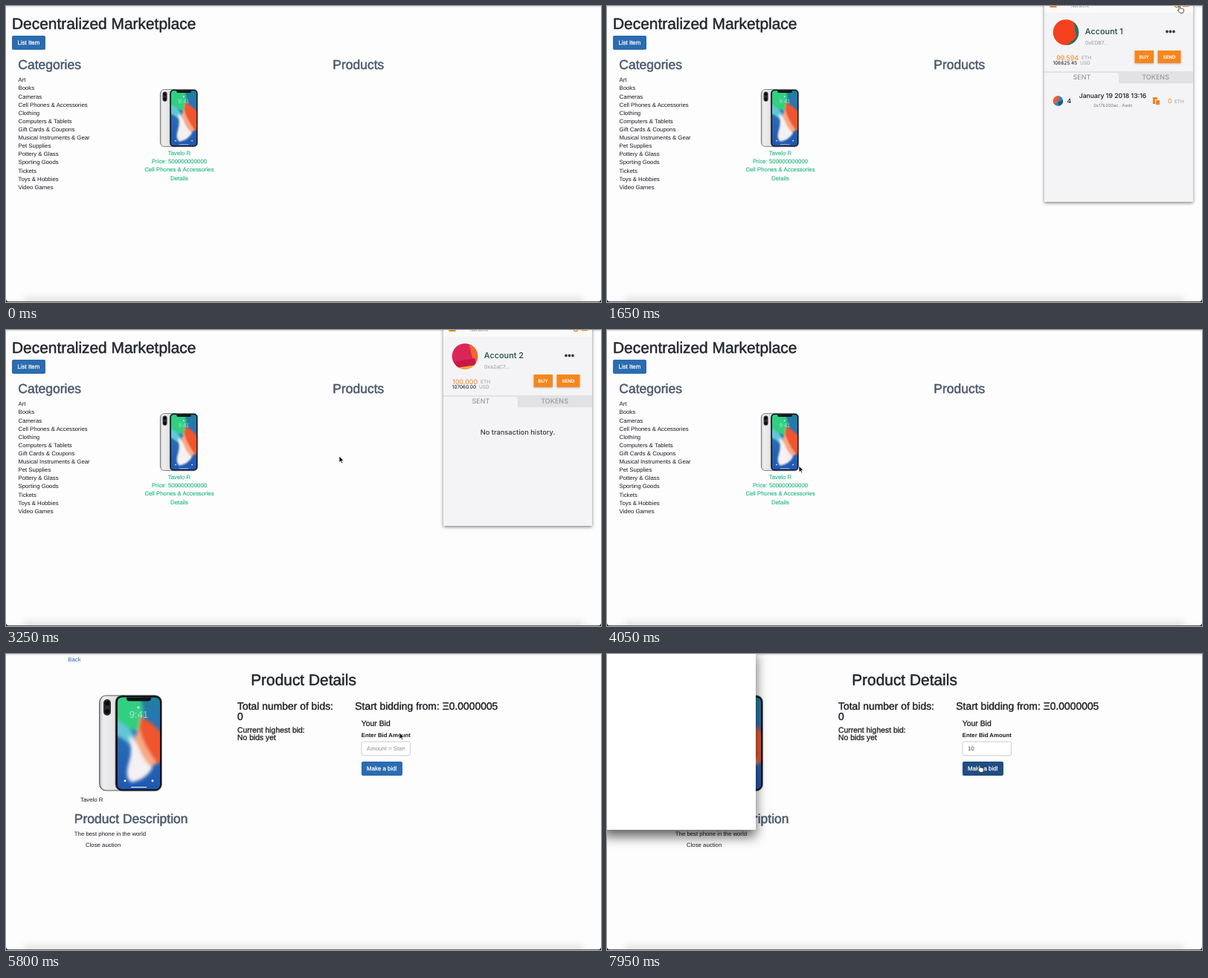
An HTML page that plays this animation: 800x399 px, repeating every 8000 ms.

```html
<!DOCTYPE html>
<html lang="en">
<head>
<meta charset="utf-8">
<title>Decentralized Marketplace</title>
<style>
html, body { margin: 0; width: 100%; height: 100%; overflow: hidden; background: #fdfdfe; }
svg { display: block; width: 100vw; height: 100vh; }
text { font: 7.8px "Liberation Sans", Arial, sans-serif; fill: #16191c; text-rendering: geometricPrecision; white-space: pre; }
.h1, .h2, .h3, .h4 { stroke: #23272b; stroke-width: .4px; }
.h1 { font-size: 20.9px; fill: #23272b; stroke-width: .5px; }
.h2 { font-size: 17.5px; fill: #4a586b; stroke: #4a586b; stroke-width: .5px; }
.h3 { font-size: 13.9px; }
.h4 { font-size: 10.4px; stroke-width: .3px; }
.bold { font-weight: 700; }
.btn { font-size: 7.9px; fill: #fff; stroke: #fff; stroke-width: .25px; }
.green { fill: #1cb57a; stroke: #1cb57a; stroke-width: .1px; }
.link { fill: #2a67a5; }
.mid { text-anchor: middle; }
#wallet text { font-family: Inter, "Open Sans", sans-serif; font-weight: 500; }
#wallet .grey { fill: #9a9a9c; }
#wallet .orange { fill: #f5811f; }
</style>
</head>
<body>
<svg id="stage" viewBox="0 0 800 399" preserveAspectRatio="none">
  <defs>
    <linearGradient id="metal">
      <stop stop-color="#bfc0c2"/><stop offset=".12" stop-color="#eeeeef"/><stop offset="1" stop-color="#d4d5d7"/>
    </linearGradient>
    <linearGradient id="sky" x2="0" y2="1">
      <stop stop-color="#1f7f9c"/><stop offset=".3" stop-color="#2a73b8"/><stop offset="1" stop-color="#1f57b0"/>
    </linearGradient>
    <filter id="soft" x="-30%" y="-30%" width="160%" height="160%"><feGaussianBlur stdDeviation="2"/></filter>
    <filter id="haze" x="-5%" y="-60%" width="110%" height="220%"><feGaussianBlur stdDeviation="4"/></filter>
    <filter id="near" x="-10%" y="-10%" width="120%" height="125%"><feDropShadow dx="0" dy="1.5" stdDeviation="2.2" flood-opacity=".5"/></filter>
    <filter id="far" x="-20%" y="-20%" width="150%" height="150%"><feDropShadow dx="0" dy="9" stdDeviation="8" flood-opacity=".62"/></filter>
    <filter id="lift" x="-10%" y="-10%" width="120%" height="150%"><feDropShadow dx="0" dy="1" stdDeviation=".9" flood-opacity=".25"/></filter>
    <clipPath id="screen"><rect x="25" y="3.6" width="57" height="123.6" rx="6"/></clipPath>
    <clipPath id="face"><circle cx="617" cy="35.5" r="17.3"/></clipPath>
    <clipPath id="chip"><circle cx="606.5" cy="128" r="6.7"/></clipPath>
    <clipPath id="field"><rect x="484" y="119" width="52.5" height="17"/></clipPath>
    <g id="phone">
      <rect x=".7" y="1" width="42" height="128" rx="9" fill="url(#metal)" stroke="#55565a" stroke-width="1.2"/>
      <rect x="6" y="6" width="10" height="22" rx="5" fill="#2b2c30"/>
      <circle cx="11" cy="11.5" r="3.2" fill="#0c0d12"/>
      <circle cx="11" cy="22.5" r="3.2" fill="#0c0d12"/>
      <rect x="22" y=".7" width="62.5" height="129" rx="9" fill="#101114" stroke="#7c7d81" stroke-width=".8"/>
      <g clip-path="url(#screen)">
        <path d="M25 3H82V128H25Z" fill="url(#sky)"/>
        <g filter="url(#soft)">
          <path d="M20 0H54Q64 22 56 48Q40 50 20 32Z" fill="#30cf82"/>
          <path d="M20 32Q44 44 52 62L46 72Q34 58 20 54Z" fill="#62c6d8"/>
          <path d="M56 30Q72 36 86 54V90Q72 98 62 84Q50 62 56 30Z" fill="#f0542f"/>
          <path d="M53 44Q62 72 78 92L66 100Q52 84 48 62Z" fill="#f7a985"/>
          <path d="M40 56Q50 60 56 78Q64 94 72 98Q64 114 44 118Q34 112 40 92Q46 74 40 56Z" fill="#f5f0f2"/>
        </g>
        <text x="53.5" y="31" class="mid" style="font-size:13px;fill:#fff;fill-opacity:.55">9:41</text>
        <path d="M37 3H70V5Q70 8.5 66 8.5H41Q37 8.5 37 5Z" fill="#101114"/>
      </g>
      <circle cx="53" cy="17" r="1.5" fill="#fff"/>
      <circle cx="35" cy="116" r="1.4" fill="#fff"/><circle cx="72" cy="116" r="1.4" fill="#fff"/>
      <path d="M43 124.5H64" stroke="#fff" stroke-width="1"/>
    </g>
  </defs>

  <rect width="800" height="399" fill="#fdfdfe"/>
  <rect width="800" height="1.6" fill="#e3e3e6"/>

  <g id="market">
    <text class="h1" x="8" y="31">Decentralized Marketplace</text>
    <rect x="8" y="40" width="45" height="19" rx="2" fill="#2b6cb0"/>
    <text class="btn" x="15.5" y="52.3">List Item</text>
    <text class="h2" x="16.3" y="85">Categories</text>
    <text class="h2" x="439.3" y="85">Products</text>
    <g id="cats"></g>
    <use href="#phone" transform="translate(207 112) scale(.6)"/>
    <g id="card"></g>
  </g>

  <g id="detail">
    <text class="link" x="83.3" y="10">Back</text>
    <text class="h1 mid" x="400" y="42">Product Details</text>
    <use href="#phone" x="125" y="55"/>
    <text x="100" y="198.5" id="item"></text>
    <text class="h2" x="91.8" y="227.5">Product Description</text>
    <text x="91.8" y="244.5">The best phone in the world</text>
    <text x="107" y="259.5">Close auction</text>
    <text class="h3" x="311" y="75">Total number of bids:</text>
    <text class="h3" x="311" y="89.3">0</text>
    <text class="h4" x="311" y="105.6">Current highest bid:</text>
    <text class="h4" x="311" y="116.4">No bids yet</text>
    <text class="h3" x="469.3" y="75">Start bidding from: Ξ0.0000005</text>
    <text class="h4" x="477.8" y="96.8">Your Bid</text>
    <text class="bold" x="477.8" y="112.3">Enter Bid Amount</text>
    <rect id="glow" x="477" y="117.2" width="67.5" height="20.6" rx="3" fill="#cfe5f8"/>
    <rect id="input" x="478" y="118.2" width="65.5" height="18.6" rx="2.2" fill="#fff" stroke-width=".9"/>
    <g clip-path="url(#field)"><text id="amount" x="485" y="130.2"></text></g>
    <path id="caret" d="M494.4 123.5V132" stroke="#222" stroke-width=".7"/>
    <rect id="bid" x="478" y="145" width="55" height="19" rx="2"/>
    <text class="btn" x="485" y="157.3">Make a bid!</text>
    <g id="hints">
      <rect x="478" y="137.3" width="65.7" height="26.7" fill="#fff" stroke="#a8c9e2" stroke-width=".8"/>
      <text class="bold" x="482.8" y="147.3">10</text>
      <text class="bold" x="482.8" y="160.3">100</text>
    </g>
  </g>

  <rect x="24" y="392" width="752" height="16" fill="#000" fill-opacity=".09" filter="url(#haze)"/>
  <rect y="398" width="800" height="1" fill="#666"/>
  <path d="M0 395Q.4 398 4 399H0ZM800 395Q799.6 398 796 399H800Z" fill="#222"/>

  <g id="wallet">
    <rect x="588" y="-10" width="200" height="274" rx="1.5" fill="#f4f3f5" filter="url(#near)"/>
    <rect x="588" y="0" width="200" height="9" fill="#fbfafb"/>
    <rect x="595.5" y="-5" width="9" height="7" fill="#e8821e"/>
    <text class="grey" x="624" y="1.6" style="font-size:6px">Network</text>
    <path d="M763 -1Q765.5 4 769 0" fill="none" stroke="#f5811f" stroke-width="1.4"/>
    <path d="M774 .4H782" stroke="#f5811f" stroke-width="1.5"/>
    <g id="faces" clip-path="url(#face)">
      <g><path d="M599 18H635V54H599Z" fill="#f5401d"/><path d="M627 17L631 42L617 54H636V17Z" fill="#167a66"/></g>
      <g><path d="M599 18H635V54H599Z" fill="#dc2557"/><path d="M622 17L629 45L636 48V17Z" fill="#f2682c"/><path d="M599 47L634 42V55H603Z" fill="#f3b01f"/><path d="M603 43L630 38L633 47L606 51Z" fill="#c8184b"/></g>
    </g>
    <text id="who" x="642.8" y="38.4" style="font-size:10.9px;fill:#1b4946"></text>
    <text id="addr" class="grey" x="643" y="51.5" style="font-size:6.9px;font-weight:400"></text>
    <path d="M753 34.5h0M757.5 34.5h0M762 34.5h0" stroke="#3c3c3e" stroke-width="3.8" stroke-linecap="round"/>
    <text id="eth" class="orange" x="634" y="72.6" text-anchor="end" style="font-size:8.9px;font-weight:400"></text>
    <text class="grey" x="638" y="72.3" style="font-size:6.6px;font-weight:400">ETH</text>
    <text id="usd" x="632" y="79.2" text-anchor="end" style="font-size:6.5px;font-weight:400"></text>
    <text class="grey" x="636" y="79.2" style="font-size:6.5px;font-weight:400">USD</text>
    <g filter="url(#lift)" fill="#f7861c"><rect x="709.5" y="60" width="25.5" height="17"/><rect x="740.5" y="60" width="31" height="17"/></g>
    <text class="mid" x="722.2" y="70.8" style="font-size:6.2px;fill:#fff;font-weight:700">BUY</text>
    <text class="mid" x="756" y="70.8" style="font-size:6.2px;fill:#fff;font-weight:700">SEND</text>
    <path d="M588 88H788V104.3H688V93Q688 90 685 90H588Z" fill="#e2e1e3"/>
    <text class="grey mid" x="638.4" y="99.3" style="font-size:9px">SENT</text>
    <text class="grey mid" x="737.6" y="99.3" style="font-size:9px">TOKENS</text>
    <g id="sent">
      <g clip-path="url(#chip)"><path d="M599 121H614V136H599Z" fill="#2388dc"/><path d="M599 121H609L606 130L599 133Z" fill="#f25b2a"/><path d="M606 130L614 126V132L608 136Z" fill="#17616c"/></g>
      <text x="618.5" y="131" style="font-size:8.6px">4</text>
      <text class="mid" x="680" y="124.4" style="font-size:8.7px">January 19 2018 13:16</text>
      <text class="mid" x="680.5" y="136" style="font-size:5.8px;fill:#777;font-weight:400">0x17b200ac...Aedc</text>
      <path d="M734 123H740V126H737V132H734ZM738 127H743V133H738Z" fill="#f08228"/>
      <text class="orange" x="754" y="131" style="font-size:8.8px;font-weight:400">0</text>
      <text class="grey" x="763" y="130.6" style="font-size:6.4px;font-weight:400">ETH</text>
    </g>
    <text id="none" class="mid" x="688" y="141" style="font-size:9.3px;fill:#3a3a3c">No transaction history.</text>
  </g>

  <rect id="confirm" x="-6" y="-8" width="206" height="245" rx="2" fill="#fff" filter="url(#far)"/>

  <g id="cursor" stroke-linejoin="round">
    <path id="arrow" d="M0 0V8.6L2 6.8L3.3 9.7L4.7 9.1L3.4 6.2H6Z" fill="#111" stroke="#fff" stroke-width=".7"/>
    <path id="hand" d="M1 1Q2 0 2.8 1V4.2Q6 4 7.4 5.4V8.2L6.4 10.4H2.4L-.6 6.6Q-.4 5.4 1 6.4Z" fill="#fff" stroke="#222" stroke-width=".8"/>
    <path id="beam" d="M-1.5 -4Q0 -4 0 -3Q0 -4 1.5 -4M0 -3V3M-1.5 4Q0 4 0 3Q0 4 1.5 4" fill="none" stroke="#222" stroke-width=".8"/>
  </g>
</svg>
<script>
const LOOP = 8000, STEP = 50, ITEM = 'Tavelo R';
const $ = id => document.getElementById(id);
const show = (el, on) => el.setAttribute('display', on ? 'inline' : 'none');
const within = (t, a, b) => t >= a && t < b;
const rows = (lines, x, y, cls) => lines.map((s, i) =>
  `<text class="${cls}" x="${x}" y="${y + i * 11.11}">${s}</text>`).join('');

$('cats').innerHTML = rows(['Art', 'Books', 'Cameras', 'Cell Phones &amp; Accessories', 'Clothing',
  'Computers &amp; Tablets', 'Gift Cards &amp; Coupons', 'Musical Instruments &amp; Gear', 'Pet Supplies',
  'Pottery &amp; Glass', 'Sporting Goods', 'Tickets', 'Toys &amp; Hobbies', 'Video Games'], 16.5, 102.3, '');
$('card').innerHTML = rows([ITEM, 'Price: 500000000000', 'Cell Phones &amp; Accessories', 'Details'],
  233, 201.2, 'green mid');
$('item').textContent = ITEM;

const accounts = [
  { who: 'Account 1', addr: '0xEDB7...', eth: '99.594', usd: '106625.45' },
  { who: 'Account 2', addr: '0xa2aC7...', eth: '100.000', usd: '107060.00' }
];

// time, x, y of the pointer tip
const path = [
  [1300, 776, -14], [1600, 768, -1], [1850, 768, -1], [2150, 712, 30], [2450, 712, 30],
  [3100, 448, 170], [3400, 448, 170], [4000, 258, 183], [4100, 258, 183], [4450, 233, 228],
  [5250, 233, 228], [5750, 529, 106], [5850, 529, 106], [6050, 512, 127],
  [7150, 512, 127], [7450, 499, 149], [8000, 499, 149]
];

function pointer(t) {
  const i = path.findIndex(p => p[0] > t);
  if (i < 1) return path[0].slice(1);
  const [a, x, y] = path[i - 1], [b, u, v] = path[i];
  const k = (t - a) / (b - a), e = k * k * (3 - 2 * k);
  return [x + (u - x) * e, y + (v - y) * e];
}

function render(t) {
  const onDetail = t >= 5300;
  show($('market'), !onDetail);
  show($('detail'), onDetail);

  show($('wallet'), within(t, 1100, 3450));
  $('wallet').setAttribute('opacity', Math.min(1, (t - 1050) / 100, (3450 - t) / 150));
  const n = t < 2350 ? 0 : 1;
  for (const key in accounts[n]) $(key).textContent = accounts[n][key];
  [...$('faces').children].forEach((face, i) => show(face, i === n));
  show($('sent'), n === 0);
  show($('none'), n === 1);

  const focus = within(t, 6150, 7600);
  const value = t < 6500 ? '' : t < 6700 ? '1' : '10';
  $('amount').textContent = value || 'Amount > Starting price';
  $('amount').style.fill = value ? '#444' : '#8c8c8e';
  $('input').setAttribute('stroke', focus ? '#66afe9' : '#c6c7c9');
  show($('glow'), focus);
  show($('caret'), focus && (within(t, 6500, 7150) || t % 1000 < 500));
  $('caret').setAttribute('transform', `translate(${(value.length - 2) * 4.34} 0)`);
  show($('hints'), within(t, 6500, 7200));
  $('bid').setAttribute('fill', t >= 7400 ? '#204d82' : '#2b6cb0');
  show($('confirm'), t >= 7800);

  const [x, y] = pointer(t);
  const hand = within(t, 1450, 1950) || within(t, 4400, 5300) || t >= 7350;
  const beam = within(t, 5950, 7250);
  show($('cursor'), t >= 1300 && !within(t, 6500, 7150));
  $('cursor').setAttribute('transform', `translate(${x} ${y})`);
  show($('hand'), hand);
  show($('beam'), beam);
  show($('arrow'), !hand && !beam);
}

function tick() {
  render(Math.floor(performance.now() % LOOP / STEP) * STEP);
  requestAnimationFrame(tick);
}
tick();
</script>
</body>
</html>
```
